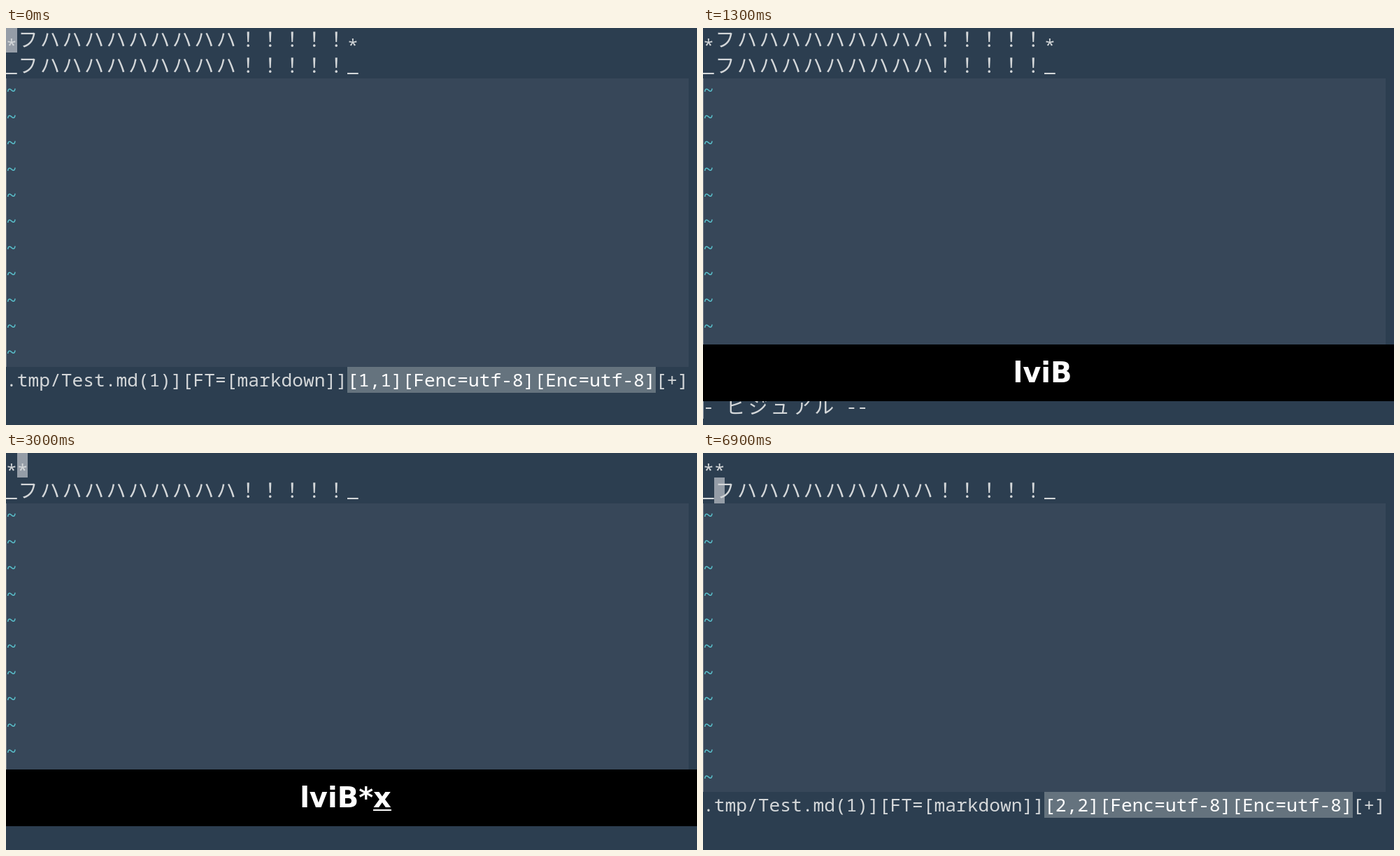
These frames come from a looping animation (988 px wide and 567 px high, 8000 ms). An HTML page with a canvas:

```html
<!DOCTYPE html>
<html lang="ja">
<head>
<meta charset="utf-8">
<title>Text object demo</title>
<style>
html, body { margin: 0; width: 100%; height: 100%; overflow: hidden; background: #2c3e50; }
canvas { display: block; }
</style>
</head>
<body>
<canvas id="stage" width="988" height="567"></canvas>
<script>
const ctx = document.getElementById('stage').getContext('2d');
const LOOP = 8000, CELL = 15.74, ROW = 37.4;
const MONO = '"Noto Sans Mono", "DejaVu Sans Mono", monospace';
const KANA = '"Noto Sans CJK JP", "Noto Sans Mono CJK JP", sans-serif';
const INK = '#d4d7d9', TEAL = '#59bfcb', GREY = '#959da7';

const WORD = 'フ' + 'ハ'.repeat(9) + '！'.repeat(5);
const MODE = '- ビジュアル --';

// Each entry changes part of the state from its time on; u = last key underlined.
const EVENTS = [
  [0, { bar: false, keys: '', u: false, row0: `*${WORD}*`, cur: [0, 0], sel: false, mode: '', cmd: '', pos: '[1,1]' }],
  [300, { bar: true, keys: 'l', u: true, cur: [1, 0] }],
  [500, { keys: 'lv', mode: MODE, cmd: '1-3' }],
  [700, { u: false }],
  [800, { keys: 'lvi', u: true, cmd: 'i' }],
  [1000, { u: false }],
  [1100, { keys: 'lviB', u: true, cmd: '', cur: [-1, 14] }],
  [1300, { u: false }],
  [1700, { keys: 'lviB*', u: true, cur: [29, 0], sel: true, cmd: '15-45' }],
  [1900, { u: false }],
  [3000, { keys: 'lviB*x', u: true, row0: '**', cur: [1, 0], sel: false, mode: '', cmd: '' }],
  [3200, { u: false }],
  [4400, { keys: 'lviB*xj', u: true }],
  [4500, { cur: [1, 1] }],
  [4600, { u: false }],
  [6900, { bar: false, pos: '[2,2]' }]
];

ctx.font = `300 100px ${MONO}`;
const monoFont = `300 ${CELL * 100 / ctx.measureText('M').width}px ${MONO}`;
const kanaFont = `300 28px ${KANA}`;

// Vertical shifts that centre symbols in the row.
const SHIFT = { '*': 7.5, '~': -2.5, '_': -1 };

const rowTop = r => r ? Math.round(ROW * r - 2.4) : 0;
const baseline = r => ROW * r + 26;

function rect(color, x, y, w, h) {
  ctx.fillStyle = color;
  ctx.fillRect(x, y, w, h);
}

function cells(color, col, row, count) {
  const x = Math.round(col * CELL), y = rowTop(row);
  rect(color, x, y, Math.round((col + count) * CELL) - x, rowTop(row + 1) - y);
}

// Draws text on the terminal grid and returns the column after it.
function type(str, col, row, color = INK) {
  ctx.fillStyle = color;
  ctx.textAlign = 'center';
  for (const ch of str) {
    const wide = ch > '\u2fff', span = wide ? 2 : 1;
    const dy = wide ? 1 : SHIFT[ch] || 0;
    ctx.font = wide ? kanaFont : monoFont;
    ctx.fillText(ch, (col + span / 2) * CELL, baseline(row) + dy);
    col += span;
  }
  return col;
}

function drawStatus(pos) {
  const info = `${pos}[Fenc=utf-8][Enc=utf-8]`;
  const col = type('.tmp/Test.md(1)][FT=[markdown]]', 0, 13);
  cells('#65737e', col, 13, info.length);
  type('[+]', type(info, col, 13, '#ffffff'), 13);
}

function drawKeys(keys, underlined) {
  rect('#000', 0, 452, 988, 81);
  ctx.font = 'bold 40px "DejaVu Sans", sans-serif';
  ctx.textAlign = 'left';
  ctx.fillStyle = '#fff';
  const w = ctx.measureText(keys).width, x = 485.5 - w / 2;
  ctx.fillText(keys, x, 506);
  if (underlined) {
    const last = ctx.measureText(keys.slice(-1)).width;
    const end = Math.round(x + w);
    rect('#fff', Math.round(end - last), 509, Math.round(last), 2);
  }
}

function draw(t) {
  const s = {};
  for (const [at, change] of EVENTS) if (at <= t) Object.assign(s, change);

  rect('#2c3e50', 0, 0, 988, 567);
  rect('#374759', 0, 72, 976, 412);
  rect('#717b86', 0, 72, 1, 412);
  cells(GREY, s.cur[0], s.cur[1], 1);
  if (s.cur[0] < 0) rect(GREY, 0, 521, 1, 37);

  type(s.row0, 0, 0);
  if (s.sel) {
    ctx.save();
    ctx.beginPath();
    ctx.rect(Math.round(CELL), 0, Math.round(CELL * 28), 35);
    ctx.clip();
    cells('#008000', 1, 0, 28);
    type(WORD, 1, 0, '#000');
    ctx.restore();
  }
  type(`_${WORD}_`, 0, 1);
  for (let r = 2; r < 13; r++) type('~', 0, r, TEAL);
  type(s.mode, 0, 14);
  type(s.cmd, 51, 14);
  if (s.bar) drawKeys(s.keys, s.u);
  else drawStatus(s.pos);
}

const start = performance.now();
function tick() {
  draw((performance.now() - start) % LOOP);
  requestAnimationFrame(tick);
}
tick();
</script>
</body>
</html>
```
